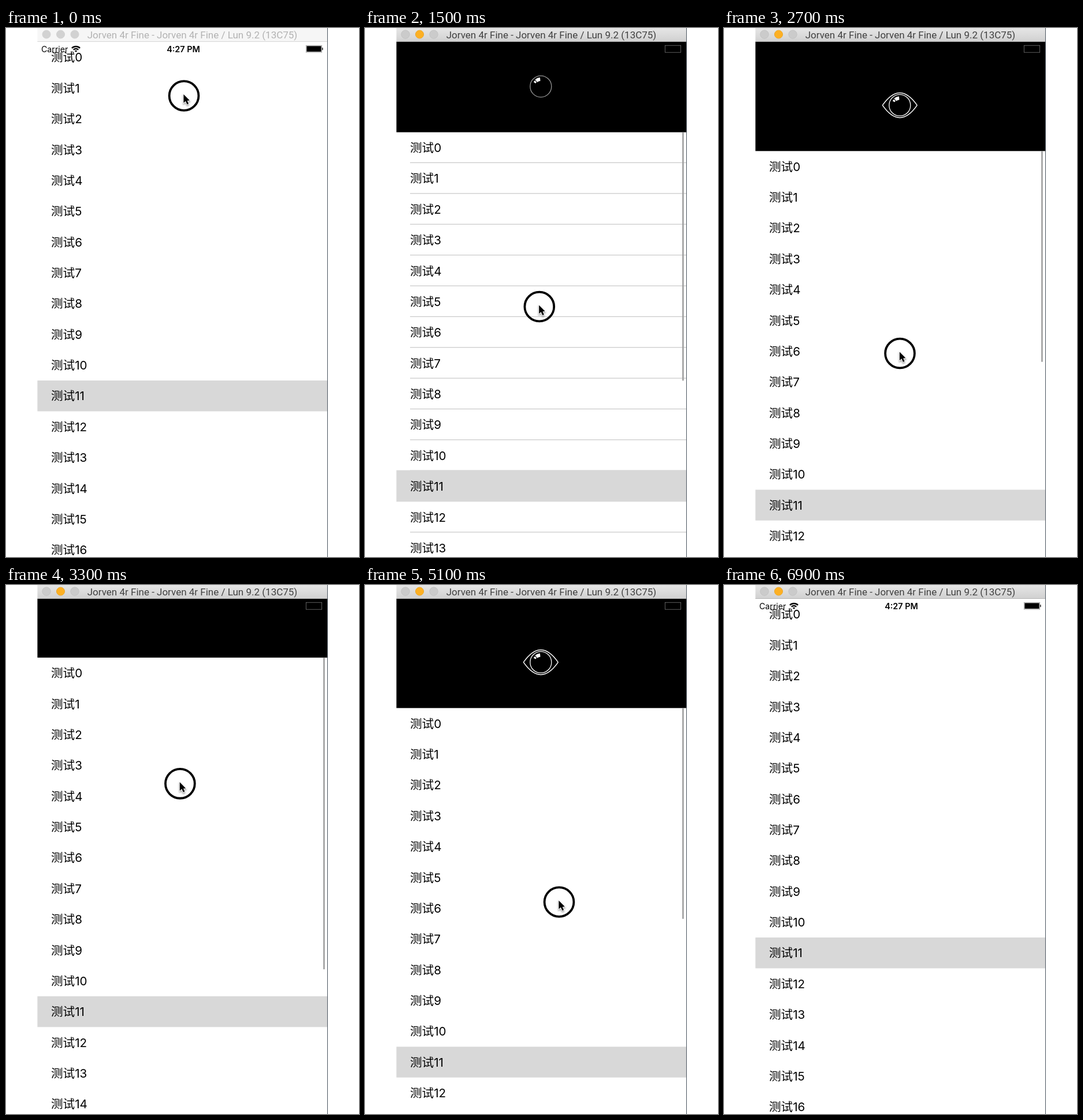
Recreate the animation shown at these times as an HTML page with a canvas. Size 611 by 917 pixels, loop 7.2 s.

```html
<!DOCTYPE html>
<html lang="zh-CN">
<head>
<meta charset="utf-8">
<style>
  html, body { margin: 0; width: 100%; height: 100%; overflow: hidden; background: #fff; }
  canvas { display: block; }
</style>
</head>
<body>
<canvas id="stage" width="611" height="917"></canvas>
<script>
const ctx = document.getElementById('stage').getContext('2d');
const LEFT = 54.4, RIGHT = 556, BAR = 24, ROW = 53.37, POINT = ROW / 44;
const STEP = 300, LOOP = 7200, RELEASE = 5100, SCROLL_END = 6300, SELECTED = 11;

// Turning points of the drag: time, list top, pointer x, pointer y.
const drag = [
  [0, 24, 308, 117.5],
  [900, 128.5, 308, 350.5],
  [1500, 180.7, 301.8, 483],
  [2700, 213.3, 304.5, 564],
  [3000, 167.6, 303, 448],
  [3600, 98, 300, 275],
  [4200, 125, 299.6, 337],
  [4500, 214, 318, 552],
  [RELEASE, 213.3, 336, 549.5]
];

const ramp = (v, from, to) => Math.min(1, Math.max(0, (v - from) / (to - from)));

// Smooth (cubic Hermite) curve through one column of the drag points.
function follow(time, column) {
  const last = drag.length - 1;
  const i = Math.min(last, drag.findIndex(key => key[0] >= time) || 1);
  const slope = k => {
    const a = drag[Math.max(0, k - 1)], b = drag[Math.min(last, k + 1)];
    return (b[column] - a[column]) / (b[0] - a[0]);
  };
  const from = drag[i - 1], to = drag[i], span = to[0] - from[0];
  const s = (time - from[0]) / span, r = 1 - s;
  return r * r * (1 + 2 * s) * from[column] + s * s * (3 - 2 * s) * to[column]
    + span * s * r * (r * slope(i - 1) - s * slope(i));
}

// While dragged the list follows the pointer; once let go it springs back.
function listTop(time) {
  return time <= RELEASE ? follow(time, 1)
    : BAR + 189.3 * Math.exp((RELEASE - time) / 87);
}

function rect(color, x, y, w, h) {
  ctx.fillStyle = color;
  ctx.fillRect(x, y, w, h);
}

function text(str, x, y, font, color = '#000', align = 'left') {
  ctx.font = font;
  ctx.fillStyle = color;
  ctx.textAlign = align;
  ctx.fillText(str, x, y);
}

function arc(x, y, r, width, color, from = 0, to = 360) {
  ctx.beginPath();
  ctx.arc(x, y, r, from * Math.PI / 180, to * Math.PI / 180);
  ctx.lineWidth = width;
  ctx.strokeStyle = color;
  ctx.stroke();
}

function drawTitleBar(active) {
  const shade = ctx.createLinearGradient(0, 0, 0, BAR);
  shade.addColorStop(0, active ? '#e6e6e6' : '#f6f6f6');
  shade.addColorStop(1, active ? '#d0d0d0' : '#f6f6f6');
  rect(shade, LEFT, 0, RIGHT - LEFT, BAR);
  rect(active ? '#b4b4b4' : '#d6d6d6', LEFT, BAR - 1, RIGHT - LEFT, 1);
  for (let i = 0; i < 3; i++) {
    const lit = active && i === 1;
    arc(70 + 24.5 * i, 11, 7, 1, lit ? '#dd9a22' : active ? '#b0b0b0' : '#d0d0d0');
    ctx.fillStyle = lit ? '#fcb024' : active ? '#cbcbcb' : '#d2d2d2';
    ctx.fill();
  }
  text('Jorven 4r Fine - Jorven 4r Fine / Lun 9.2 (13C75)', 322.5, 17.5,
    '17px Roboto, sans-serif', active ? '#404040' : '#b2b2b2', 'center');
}

function drawRows(top) {
  // Hairlines survive the 3:1 screen scaling only at one scroll phase.
  const hairlines = Math.round((top - BAR) / POINT * 3) % 3 === 1;
  for (let i = 0, y = top; y < 917; i++, y += ROW) {
    const lead = hairlines ? POINT : 0;
    if (i === SELECTED) rect('#d8d8d8', LEFT, y - lead, RIGHT - LEFT, ROW + lead);
    else if (hairlines) rect('#c8c8c8', 78, y + ROW - POINT, RIGHT - 78, POINT);
    text('测试' + i, 78, y + 34.4, '20.6px Inter, "Noto Sans CJK SC", "Noto Sans CJK", sans-serif');
  }
}

function drawStatusBar() {
  text('Carrier', 61, 42, '14.2px Inter, sans-serif');
  text('4:27 PM', 307, 42, '600 14.4px Inter, sans-serif', '#000', 'center');
  for (const r of [2, 6, 10]) arc(121, 42, r, 2.3, '#000', 225, 315);
  ctx.lineWidth = 0.7;
  ctx.strokeStyle = '#888';
  ctx.strokeRect(519.3, 30.2, 27.4, 12);
  rect('#000', 520.4, 31.3, 25.2, 9.8);
  rect('#000', 547.2, 34.2, 1.3, 4);
}

// The eye appears in stages as the list is pulled down.
function drawEye(top) {
  const glint = ramp(top, 145, 165), ball = ramp(top, 160, 195), lids = ramp(top, 184, 212);
  ctx.save();
  ctx.translate(304.3, top - 79.4);
  if (glint) {
    arc(0, 0, 12.5, 6 * glint, '#fff', 230, 265);
    arc(0, 0, 12.5, 4 * glint, '#fff', 211, 225);
  }
  arc(0, 0, 18.5, 1.3, `rgba(255,255,255,${ball})`);
  if (lids) {
    ctx.setLineDash([82 * lids, 200]);
    ctx.lineWidth = 1.5;
    ctx.strokeStyle = '#fff';
    for (const side of [-1, 1]) {
      ctx.beginPath();
      ctx.moveTo(-30, 0);
      ctx.quadraticCurveTo(0, 43 * side, 30, 0);
      ctx.stroke();
    }
  }
  ctx.restore();
}

function drawPointer(x, y) {
  arc(x, y, 25.4, 3.8, '#000');
  ctx.save();
  ctx.translate(x - 0.6, y - 2.5);
  ctx.scale(0.87, 0.87);
  const arrow = new Path2D('M0 0V17L4 13.5L7 20L10 18.7L7.2 12.5L12 12.2Z');
  ctx.shadowColor = 'rgba(0,0,0,.45)';
  ctx.shadowBlur = 3;
  ctx.shadowOffsetY = 2;
  ctx.lineWidth = 2;
  ctx.strokeStyle = '#fff';
  ctx.stroke(arrow);
  ctx.shadowColor = 'transparent';
  ctx.fillStyle = '#000';
  ctx.fill(arrow);
  ctx.restore();
}

function draw(now) {
  const time = Math.floor(now % LOOP / STEP) * STEP;
  const top = listTop(time);
  rect('#fff', 0, 0, 611, 917);
  drawRows(top);
  rect('#000', LEFT, BAR, RIGHT - LEFT, top - BAR);
  drawEye(top);
  drawStatusBar();
  if (time > 0 && time < SCROLL_END) rect('#9c9c9c', 549.2, top, 2.5, 792 - 2 * top);
  drawTitleBar(time > 0);
  rect('#4c5660', RIGHT, 0, 1, 917);
  if (time <= RELEASE) drawPointer(follow(time, 2), follow(time, 3));
  requestAnimationFrame(() => draw(performance.now()));
}
draw(0);
</script>
</body>
</html>
```
